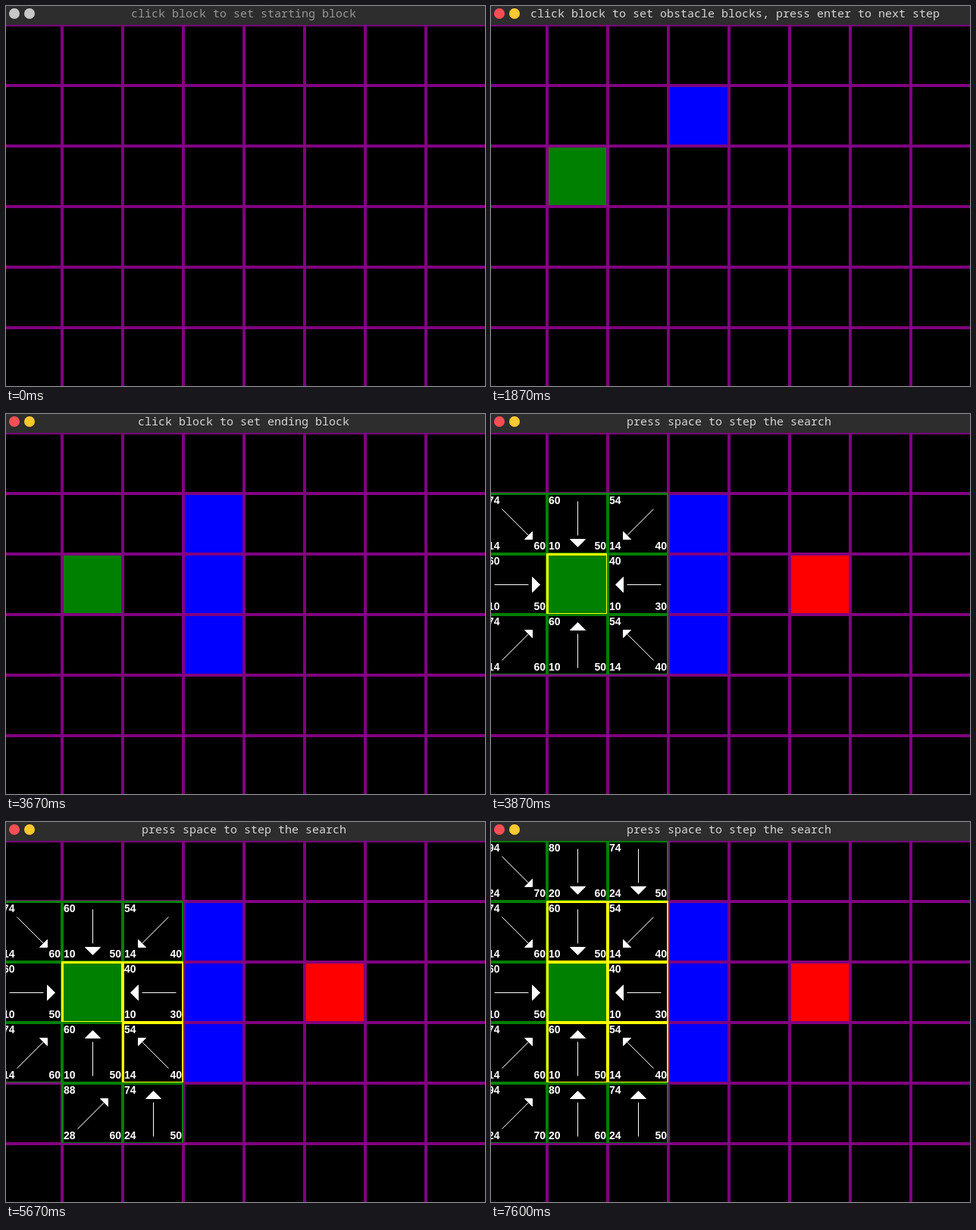
An HTML page with a canvas for the animation above (8000 ms loop, 632 px wide and 502 px high).

```html
<!DOCTYPE html>
<html lang="en">
<head>
<meta charset="utf-8">
<title>Path search</title>
<style>
html, body { margin: 0; width: 100%; height: 100%; overflow: hidden; background: #000; }
canvas { display: block; }
</style>
</head>
<body>
<canvas id="stage" width="632" height="502"></canvas>
<script>
const ctx = document.getElementById('stage').getContext('2d');
const LOOP = 8000, CELL = 80, LEFT = -6, TOP = 25;
const FOCUS_AT = 730, START_AT = 800, SEARCH_AT = 3870;
const start = [1, 2], goal = [5, 2];
const walls = [[1870, 3, 1], [2270, 3, 2], [2670, 3, 3]];
const expansions = [
  [SEARCH_AT, 1, 2], [5000, 2, 2], [5670, 2, 3],
  [6200, 2, 1], [6800, 1, 3], [7600, 1, 1]
];
const titles = [
  [0, 165, 'click block to set starting block'],
  [START_AT, 52, 'click block to set obstacle blocks, press enter to next step'],
  [3670, 174, 'click block to set ending block'],
  [SEARCH_AT, 179, 'press space to step the search']
];

const isWall = (c, r) => walls.some(([, wc, wr]) => wc === c && wr === r);
const key = (c, r) => r * 10 + c;

// A* without cutting wall corners, advanced to time t
function search(t) {
  const nodes = new Map();
  if (t < SEARCH_AT) return nodes;
  nodes.set(key(...start), { c: start[0], r: start[1], g: 0, closed: false });
  for (const [at, pc, pr] of expansions) {
    if (t < at) break;
    const parent = nodes.get(key(pc, pr));
    parent.closed = true;
    for (let dr = -1; dr <= 1; dr++) for (let dc = -1; dc <= 1; dc++) {
      const c = pc + dc, r = pr + dr;
      if (c < 0 || r < 0 || isWall(c, r) || isWall(c, pr) || isWall(pc, r)) continue;
      const old = nodes.get(key(c, r));
      const g = parent.g + (dc && dr ? 14 : 10);
      if (old && (old.closed || old.g <= g)) continue;
      nodes.set(key(c, r), { c, r, g, dx: -dc, dy: -dr, closed: false });
    }
  }
  return nodes;
}

function rect(color, x, y, w, h) {
  ctx.fillStyle = color;
  ctx.fillRect(x, y, w, h);
}

function dot(color, x) {
  ctx.fillStyle = color;
  ctx.beginPath();
  ctx.arc(x, 10, 7, 0, 7);
  ctx.fill();
}

const fillCell = (color, c, r) =>
  rect(color, LEFT + c * CELL + 2, TOP + r * CELL + 2, 76, 76);

function outline(color, x, y) {
  rect(color, x - 1, y - 1, 3, 80);
  rect(color, x - 1, y - 1, 81, 3);
  rect(color, x + 78, y - 1, 2, 80);
  rect(color, x - 1, y + 78, 81, 1);
}

function arrow(cx, cy, dx, dy) {
  const diagonal = dx && dy, tip = diagonal ? 20 : 30;
  const at = (a, b) => [cx + a + 0.5, cy + b + 0.5];
  const head = diagonal
    ? [at(20 * dx, 10 * dy), at(10 * dx, 20 * dy)]
    : [at(20 * dx + 10 * dy, 20 * dy + 10 * dx), at(20 * dx - 10 * dy, 20 * dy - 10 * dx)];
  ctx.fillStyle = ctx.strokeStyle = '#fff';
  ctx.lineWidth = 1;
  ctx.beginPath();
  ctx.moveTo(...at(-tip * dx, -tip * dy));
  ctx.lineTo(...at(15 * dx, 15 * dy));
  ctx.stroke();
  ctx.beginPath();
  ctx.moveTo(...at(tip * dx, tip * dy));
  head.forEach(p => ctx.lineTo(...p));
  ctx.closePath();
  ctx.fill();
  ctx.stroke();
}

function drawNode({ c, r, g, dx, dy, closed }) {
  const x = LEFT + c * CELL, y = TOP + r * CELL;
  outline(closed ? '#ff0' : '#008000', x, y);
  if (!g) return;
  const h = 10 * (Math.abs(goal[0] - c) + Math.abs(goal[1] - r));
  arrow(x + 40, y + 40, dx, dy);
  ctx.font = 'bold 14px "Liberation Sans", sans-serif';
  ctx.textAlign = 'left';
  ctx.fillText(g + h, x + 2, y + 34 - 20);
  ctx.fillText(g, x + 2, y + 74);
  ctx.textAlign = 'right';
  ctx.fillText(h, x + 78, y + 74);
}

function drawTitleBar(t) {
  const focused = t >= FOCUS_AT;
  rect('#2d2d2d', 0, 0, 632, TOP);
  dot(focused ? '#f84f55' : '#c8c8c8', 11);
  dot(focused ? '#fdc92f' : '#c8c8c8', 31);
  const [, x, text] = titles.filter(([at]) => t >= at).pop();
  ctx.font = '15px "Noto Sans Mono", monospace';
  ctx.textAlign = 'left';
  ctx.fillStyle = focused ? '#d6d6d6' : '#969696';
  ctx.fillText(text, x, 15);
}

function draw(t) {
  rect('#000', 0, 0, 632, 502);
  for (let i = 0; i < 8; i++) {
    rect('#800080', LEFT + i * CELL - 2, TOP, 4, 480);
    rect('#800080', 0, TOP + i * CELL - 2, 632, 4);
  }
  if (t >= START_AT) fillCell('#008000', ...start);
  for (const [at, c, r] of walls) if (t >= at) fillCell('#00f', c, r);
  if (t >= SEARCH_AT) fillCell('#f00', ...goal);
  [...search(t).values()].sort((a, b) => key(a.c, a.r) - key(b.c, b.r)).forEach(drawNode);
  drawTitleBar(t);
}

function frame() {
  draw(performance.now() % LOOP);
  requestAnimationFrame(frame);
}
frame();
</script>
</body>
</html>
```
